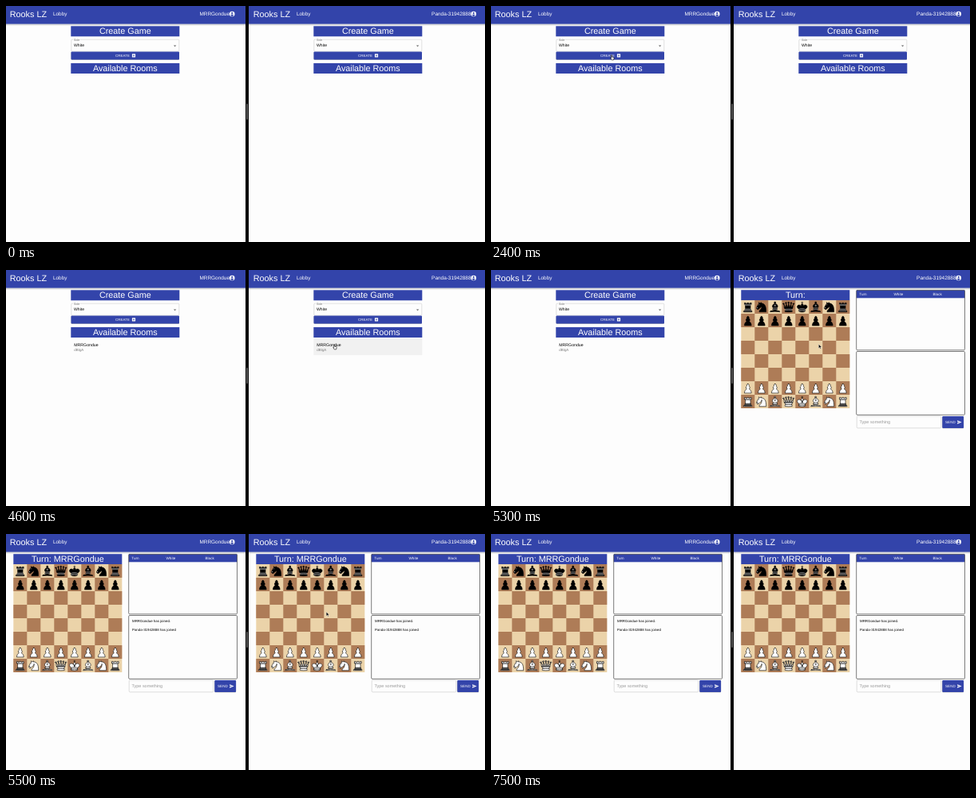
An HTML page that plays this animation: 600 by 297 pixels, repeating every 7.6 s.

```html
<!DOCTYPE html>
<html lang="en">
<head>
<meta charset="utf-8">
<title>Board game lobby</title>
<style>
  html, body { margin: 0; width: 100%; height: 100%; overflow: hidden; background: #fdfdfd; }
  svg { display: block; width: 100%; height: 100%; }
  text { font-family: "Liberation Sans", Arial, sans-serif; white-space: pre; text-rendering: geometricPrecision; }
</style>
</head>
<body>
<svg id="stage" viewBox="0 0 600 297"></svg>
<script>
const BLUE = '#3344aa', LOOP = 7600, STEP = 100;
const APP = 'Rooks LZ', HOST = 'MRRGondue', VISITOR = 'Panda-31942888';

const rect = (x, y, w, h, fill, extra = '') =>
  `<rect x="${x}" y="${y}" width="${w}" height="${h}" fill="${fill}" ${extra}/>`;
const text = (x, y, size, content, fill = '#000', extra = '') =>
  `<text x="${x}" y="${y}" font-size="${size}" fill="${fill}" ${extra}>${content}</text>`;
const path = (d, extra = '') => `<path d="${d}" ${extra}/>`;
const dot = (x, y, r) => `M${x - r} ${y}a${r} ${r} 0 1 0 ${2 * r} 0a${r} ${r} 0 1 0 ${-2 * r} 0z`;

// Each piece is a body and its inner lines, on a 45 unit square.
const pieces = {
  p: ['M22.5 9c-2.2 0-4 1.8-4 4 0 .9.3 1.7.8 2.4C17.3 16.5 16 18.6 16 21c0 2 .9 3.8 2.4 5-3 1.1-7.4 5.6-7.4 13.5h23c0-7.9-4.4-12.4-7.4-13.5 1.5-1.2 2.4-3 2.4-5 0-2.4-1.3-4.5-3.3-5.6.5-.7.8-1.5.8-2.4 0-2.2-1.8-4-4-4z', ''],
  r: ['M9 39h27v-3H9zM12 36v-4h21v4zM11 14V9h4v2h5V9h5v2h5V9h4v5l-3 3v12.5l1.5 2.5h-20l1.5-2.5V17z',
      'M12 35.5h21M13 31.5h19M14 29.5h17M14 17h17M11 14h23'],
  n: ['M22 10c10.5 1 16.5 8 16 29H15c0-9 10-6.5 8-21M24 18c.4 2.9-5.5 7.4-8 9-3 2-2.8 4.3-5 4-1-.9 1.4-3 0-3-1 0 .2 1.2-1 2-1 0-4 1-4-4 0-2 6-12 6-12s1.9-1.9 2-3.5c-.7-1-.5-2-.5-3 1-1 3 2.5 3 2.5h2s.8-2 2.5-3c1 0 1 3 1 3',
      dot(9, 25.5, .5) + 'M14.5 15l-.5 1'],
  b: ['M9 36c3.4-1 10.1.4 13.5-2 3.4 2.4 10.1 1 13.5 2 0 0 1.6.5 3 2-.7 1-1.6 1-3 .5-3.4-1-10.1.5-13.5-1-3.4 1.5-10.1 0-13.5 1-1.4.5-2.3.5-3-.5 1.4-1.9 3-2 3-2zM15 32c2.5 2.5 12.5 2.5 15 0 .5-1.5 0-2 0-2 0-2.5-2.5-4-2.5-4 5.5-1.5 6-11.5-5-15.5-11 4-10.5 14-5 15.5 0 0-2.5 1.5-2.5 4 0 0-.5.5 0 2z' + dot(22.5, 8, 2.5),
      'M17.5 26h10M15 30h15M22.5 15.5v5M20 18h5'],
  q: ['M9 26c8.5-1.5 21-1.5 27 0l2-12-7 11V11l-5.5 13.5-3-15-3 15-5.5-14V25L7 14zM9 26c0 2 1.5 2 2.5 4 1 1.5 1 1 .5 3.5-1.5 1-1.5 2.5-1.5 2.5-1.5 1.5.5 2.5.5 2.5 6.5 1 16.5 1 23 0 0 0 1.5-1 0-2.5 0 0 .5-1.5-1-2.5-.5-2.5-.5-2 .5-3.5 1-2 2.5-2 2.5-4-8.5-1.5-18.5-1.5-27 0z' +
      [[6, 12], [14, 9], [22.5, 8], [31, 9], [39, 12]].map(([x, y]) => dot(x, y, 2)).join(''),
      'M11.5 30c3.5-1 18.5-1 22 0M12 33.5c6-1 15-1 21 0'],
  k: ['M22.5 11.6V6M20 8h5M22.5 25s4.5-7.5 3-10.5c0 0-1-2.5-3-2.5s-3 2.5-3 2.5c-1.5 3 3 10.5 3 10.5M11.5 37c5.5 3.5 15.5 3.5 21 0v-7s9-4.5 6-10.5c-4-6.5-13.5-3.5-16 4V27v-3.5c-3.5-7.5-13-10.5-16-4-3 6 5 10 5 10z',
      'M11.5 30c5.5-3 15.5-3 21 0M11.5 33.5c5.5-3 15.5-3 21 0M11.5 37c5.5-3 15.5-3 21 0']
};

function piece(kind, white, col, row) {
  const [body, lines] = pieces[kind];
  const fill = white ? '#fff' : '#000';
  return `<g transform="translate(${9.3 + col * 17} ${38 + row * 17}) scale(.378)" stroke-width="1.6" stroke-linejoin="round" stroke-linecap="round">` +
    path(body, `fill="${fill}" stroke="#000"`) +
    path(lines, `fill="none" stroke="${white ? '#000' : '#ddd'}" stroke-width="1.3"`) + '</g>';
}

function board() {
  let out = rect(9.3, 38, 136, 136, '#ebd3a9');
  for (let i = 0; i < 64; i++) {
    const col = i % 8, row = i >> 3;
    if ((col + row) % 2) out += rect(9.3 + col * 17, 38 + row * 17, 17, 17, '#ae7c57');
  }
  [...'rnbqkbnr'].forEach((kind, col) => {
    out += piece(kind, false, col, 0) + piece('p', false, col, 1) +
           piece('p', true, col, 6) + piece(kind, true, col, 7);
  });
  return out;
}

const banner = (x, y, label, id = '') =>
  rect(x, y, 136, 13, BLUE) +
  text(x + 68, y + 10.1, 10.8, label, '#fff', `text-anchor="middle" ${id && `id="${id}"`}`);

function button(x, y, w, h, id = '') {
  return rect(x, y + .6, w, h, '#000', 'rx="1" opacity=".25"') +
         rect(x, y, w, h, BLUE, `rx="1" ${id && `id="${id}"`}`);
}

function header(width, user, titleX, iconX) {
  return rect(0, 22.5, width, 1, '#000', 'opacity=".22"') +
    rect(0, 23.5, width, 1.2, '#000', 'opacity=".08"') +
    rect(0, 0, width, 22.6, BLUE) +
    text(titleX, 14.3, 10.8, APP, '#fff') + text(titleX + 54.2, 12.3, 6.4, 'Lobby', '#fff') +
    text(iconX - 3.2, 12.3, 6.45, user, '#fff', 'text-anchor="end"') +
    `<circle cx="${iconX}" cy="10" r="3.3" fill="#fff"/><circle cx="${iconX}" cy="8.9" r="1.05" fill="${BLUE}"/>` +
    path(`M${iconX - 2} 11.8q2-2.4 4 0q-2 2.2-4 0z`, `fill="${BLUE}"`);
}

function lobby(side) {
  return `<g id="lobby${side}">` + banner(81.3, 25.3, 'Create Game') +
    rect(81.8, 42.2, 135, 14.8, 'none', 'rx="1" stroke="#c4c4c4" stroke-width=".5"') +
    rect(84, 41.5, 9, 1.4, '#fdfdfd') +
    text(84.8, 43.6, 3.8, 'Side', '#777') + text(85, 51.1, 5.1, 'White') +
    path('M209.9 49.4h3.4l-1.7 1.8z', 'fill="#666"') +
    button(81.5, 57.5, 135.5, 10, 'create' + side) +
    `<circle id="ripple${side}" cx="140" cy="62.5" fill="#fff" clip-path="url(#createClip)"/>` +
    text(137, 64.2, 4.4, 'CREATE', '#fff', 'letter-spacing=".08"') +
    rect(157.9, 60.3, 4.2, 4.2, '#fff', 'rx=".5"') +
    path('M158.8 62.4h2.4M160 61.2v2.4', `stroke="${BLUE}" stroke-width=".6"`) +
    banner(81.3, 72, 'Available Rooms') +
    `<g id="room${side}">` + rect(81.3, 86, 136, 21.2, '#f1f1f1', `id="hover${side}"`) +
    text(85.3, 95.5, 5.2, HOST) + text(85.3, 102.3, 4.4, 'dBIgA', '#777') + '</g></g>';
}

function game(side) {
  const frame = (y, h) =>
    rect(153.7, y, 135.8, h, 'none', 'rx="1.2" stroke="#444" stroke-width=".7"');
  const columns = [[157.3, 'Turn'], [200.5, 'White'], [249.5, 'Black']];
  return `<g id="game${side}">` + banner(9.3, 25.2, '', 'turn' + side) + board() +
    rect(153.7, 25.4, 135.8, 9.9, BLUE) +
    columns.map(([x, label]) => text(x, 32, 4.6, label, '#fff')).join('') +
    frame(25.4, 75.4) + frame(102.5, 79.9) +
    `<g id="joined${side}">` + text(158, 111.4, 4.4, HOST + ' has joined.') +
    text(158, 121.8, 4.4, VISITOR + ' has joined') + '</g>' +
    rect(154.2, 184, 105.6, 14.9, 'none', 'rx="1.3" stroke="#bbb" stroke-width=".5"') +
    text(157.6, 193.1, 5.45, 'Type something', '#999') +
    button(261.3, 184, 26.8, 15) + text(265, 193, 4.5, 'SEND', '#fff', 'letter-spacing=".12"') +
    path('M280.2 189.2l5.4 2.3-5.4 2.3v-1.8l3.6-.5-3.6-.5z', 'fill="#fff"') + '</g>';
}

const page = (side, x, ...headerArgs) =>
  `<g transform="translate(${x})">${header(...headerArgs)}${lobby(side)}${game(side)}</g>`;

document.getElementById('stage').innerHTML =
  `<defs><clipPath id="createClip">${rect(81.5, 57.5, 135.5, 10, '#000', 'rx="1"')}</clipPath></defs>` +
  rect(0, 0, 600, 297, '#fdfdfd') +
  page('L', 0, 300, HOST, 4.8, 283.2) + page('R', 304, 296, VISITOR, 5.8, 281.7) +
  rect(300, 0, 4, 297, '#000') + rect(301.2, 123, 1.5, 20, '#777', 'rx=".75"') +
  '<g id="pointer">' +
  path('M0 0v5l1.2-1.1.8 1.8.8-.4-.8-1.7h1.6z', 'id="arrow" fill="#000" stroke="#fff" stroke-width=".35"') +
  path('M1.2.6q.7-.5 1 .2v2l2 .5q.6.3.4 1L4 6.6H1.7L.2 4.2q.2-.7 1 0z', 'id="hand" fill="#fff" stroke="#000" stroke-width=".6"') +
  '</g>';

const el = id => document.getElementById(id);
const show = (id, on) => el(id).setAttribute('display', on ? 'inline' : 'none');

// Pointer stops: time, x, y
const stops = [
  [0, 484, 216], [300, 484, 216], [800, 401, 136], [1000, 401, 136], [1800, 175, 80],
  [2400, 149.5, 61.3], [2900, 149.5, 61.3], [3200, 241, 102], [3300, 285, 129],
  [3900, 400, 149], [4000, 400, 149], [4400, 409.5, 93.3], [5400, 410.5, 93.5],
  [6200, 195.3, 201.5], [6500, 205, 197], [7300, 421, 139], [7600, 421, 139]
];

function pointerAt(t) {
  const next = Math.max(1, stops.findIndex(stop => stop[0] >= t));
  const [t0, x0, y0] = stops[next - 1], [t1, x1, y1] = stops[next];
  const p = (t - t0) / (t1 - t0), eased = p * p * (3 - 2 * p);
  return [x0 + (x1 - x0) * eased, y0 + (y1 - y0) * eased];
}

function draw(now) {
  const t = Math.floor(now % LOOP / STEP) * STEP;
  const within = (from, to) => t >= from && t < to;
  const joined = t >= 5500;
  const started = { L: joined, R: t >= 5200 };

  for (const side of 'LR') {
    show('lobby' + side, !started[side]);
    show('game' + side, started[side]);
    show('room' + side, t >= 3000);
    show('joined' + side, joined);
    show('hover' + side, side === 'R' && t >= 4300);
    show('ripple' + side, side === 'L' && within(2900, 3600));
    el('turn' + side).textContent = joined ? 'Turn: ' + HOST : 'Turn:';
  }
  el('createL').setAttribute('fill', within(2600, 3500) ? '#22318f' : BLUE);
  el('rippleL').setAttribute('r', Math.max(0, Math.min(80, (t - 2900) * .195)));
  el('rippleL').setAttribute('opacity', .2 * Math.min(1, (3600 - t) / 300));

  const hand = within(2300, 3000) || within(4300, 5200);
  show('pointer', within(200, 7400));
  show('hand', hand);
  show('arrow', !hand);
  el('pointer').setAttribute('transform', `translate(${pointerAt(t)})`);
}

const start = performance.now();
function tick() {
  draw(performance.now() - start);
  requestAnimationFrame(tick);
}
tick();
</script>
</body>
</html>
```
